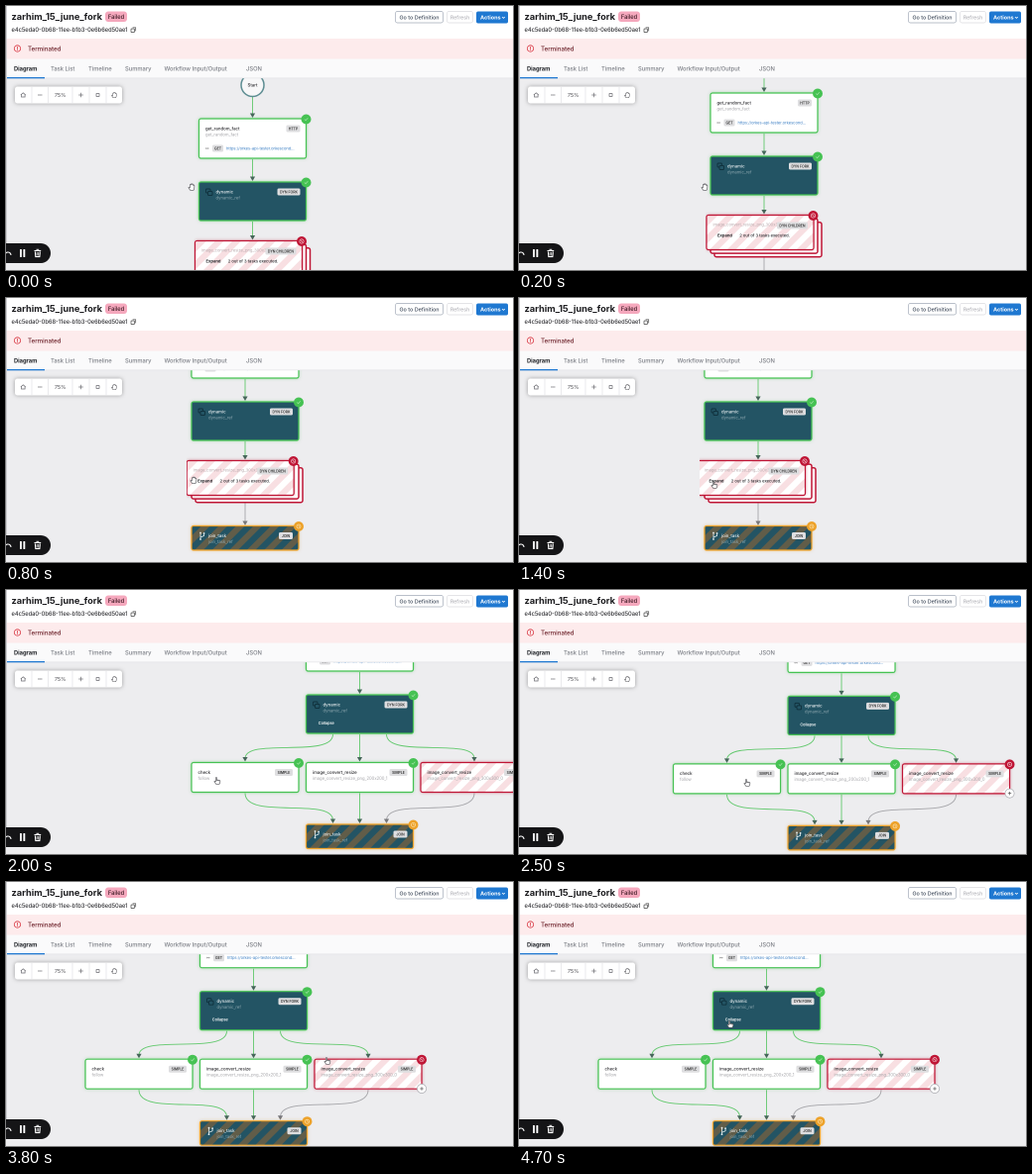
Animation of 511 by 267 pixels, one loop 4.8 s. Source, as an HTML page with a canvas:

```html
<!DOCTYPE html>
<html lang="en">
<head>
<meta charset="utf-8">
<title>Workflow run</title>
<style>
html, body { margin: 0; width: 100%; height: 100%; overflow: hidden; background: #fff; }
canvas { display: block; width: 511px; height: 267px; }
</style>
</head>
<body>
<canvas id="stage"></canvas>
<script>
const W = 511, H = 267, LOOP = 4800, STEP = 100, EXPAND_AT = 1500;
const GREEN = '#46c253', RED = '#bf1535', AMBER = '#eda22a', TEAL = '#235464', INK = '#2a2a2e';
const NODE_W = 108, STRIPE = 17.5;
const canvas = document.getElementById('stage');
const c = canvas.getContext('2d');
// Double resolution keeps the tiny lettering smooth
const scale = 2 * (window.devicePixelRatio || 1);
canvas.width = W * scale;
canvas.height = H * scale;

// Rows of [time, x, y]
const scrollKeys = [[0, 0, 0], [100, -0.5, -7], [200, -1.5, -26], [300, -3, -50],
  [400, -4.5, -67], [500, -6.5, -72], [600, -7.5, -73]];
const cursorKeys = [[0, 187, 183], [700, 187, 183], [1200, 197, 189], [1600, 197, 189],
  [2000, 213, 193], [2500, 230, 195], [3000, 331, 197], [3500, 324, 181],
  [4200, 324, 181], [4700, 213, 144]];

const clamp = v => Math.max(0, Math.min(1, v));
const smooth = v => v * v * (3 - 2 * v);

function track(keys, t) {
  let i = 1;
  while (i < keys.length - 1 && keys[i][0] < t) i++;
  const a = keys[i - 1], b = keys[i], k = clamp((t - a[0]) / (b[0] - a[0]));
  return [a[1] + (b[1] - a[1]) * k, a[2] + (b[2] - a[2]) * k];
}

function text(s, x, y, size, color = INK, weight = 500, align = 'left') {
  c.font = `${weight} ${size}px Inter, "Open Sans", sans-serif`;
  c.textAlign = align;
  c.fillStyle = color;
  c.fillText(s, x, y);
}

function box(x, y, w, h, r, fill, stroke, width = 1) {
  c.beginPath();
  c.roundRect(x, y, w, h, r);
  if (fill) { c.fillStyle = fill; c.fill(); }
  if (stroke) { c.strokeStyle = stroke; c.lineWidth = width; c.stroke(); }
}

function line(points, color, width = 1) {
  c.beginPath();
  points.forEach(([x, y]) => c.lineTo(x, y));
  c.strokeStyle = color;
  c.lineWidth = width;
  c.stroke();
}

function disc(x, y, r, fill, stroke, width = 1) {
  box(x - r, y - r, 2 * r, 2 * r, r, fill, stroke, width);
}

function glow(color, blur, draw) {
  c.save();
  c.shadowColor = color;
  c.shadowBlur = blur * scale;
  draw();
  c.restore();
}

function stripes(x, y, w, h, color) {
  c.save();
  c.beginPath();
  c.roundRect(x, y, w, h, 2);
  c.clip();
  c.fillStyle = color;
  for (let s = x + w + h - STRIPE; s > x - STRIPE; s -= STRIPE) {
    c.beginPath();
    c.moveTo(s, y);
    c.lineTo(s + STRIPE / 2, y);
    c.lineTo(s + STRIPE / 2 - h, y + h);
    c.lineTo(s - h, y + h);
    c.fill();
  }
  c.restore();
}

function badge(x, y, color) {
  disc(x, y, 5, color);
  if (color === GREEN) {
    line([[x - 1.7, y], [x - 0.4, y + 1.2], [x + 1.8, y - 1.3]], '#a4e3a8', 0.7);
  } else if (color === RED) {
    disc(x, y, 2.1, null, '#f4c9d2', 0.7);
    line([[x - 0.9, y - 0.9], [x + 0.9, y + 0.9]], '#f4c9d2', 0.7);
  } else {
    disc(x, y, 2, null, '#fff0cc', 0.6);
    line([[x, y - 1.2], [x, y], [x + 1, y + 0.4]], '#fff0cc', 0.5);
  }
}

function tag(s, right, y, w) {
  box(right - w, y, w, 7, 1.5, '#dedee0');
  text(s, right - w / 2, y + 4.8, 3.5, '#333', 600, 'center');
}

function frame(x, y, h, edge, fill, stripe) {
  glow(edge + 'a0', 3, () => box(x, y, NODE_W, h, 2, fill));
  if (stripe) stripes(x, y, NODE_W, h, stripe);
  box(x, y, NODE_W, h, 2, null, edge, 1.2);
}

function node(x, y, h, edge, fill, title, ref, label, labelW, o = {}) {
  frame(x, y, h, edge, fill, o.stripe);
  const dark = fill === TEAL, indent = o.indent || 6.5;
  text(title, x + indent, y + 11.3, 4.3, dark ? '#f1f5f6' : INK);
  text(ref, x + indent, y + 17.3, 4.2, dark ? '#8fa9b1' : '#a6a6aa', 400);
  tag(label, x + 102, y + 6.5, labelW);
  badge(x + NODE_W, y + 0.5, edge);
}

function arrowhead(x, y, color) {
  c.beginPath();
  c.moveTo(x - 2.6, y - 4.5);
  c.lineTo(x + 2.6, y - 4.5);
  c.lineTo(x, y);
  c.fillStyle = color;
  c.fill();
}

function edge(x1, y1, x2, y2, live = true) {
  const d = (y2 - y1) * 0.9;
  c.beginPath();
  c.moveTo(x1, y1);
  c.bezierCurveTo(x1, y1 + d, x2, y2 - d, x2, y2 - 3);
  c.strokeStyle = live ? '#62c96d' : '#a6a6aa';
  c.lineWidth = 0.9;
  c.stroke();
  arrowhead(x2, y2, live ? '#46665a' : '#77777b');
}

function upperNodes(x, y, open) {
  const mid = x + NODE_W / 2, top = y - 64;
  edge(mid, top - 22, mid, top - 1);
  disc(mid, top - 34, 11.5, '#f7f7f8', '#5d8d92', 1.5);
  text('Start', mid, top - 32.5, 4.3, INK, 500, 'center');

  node(x, top, 40, GREEN, '#fff', 'get_random_fact', 'get_random_fact', 'HTTP', 14);
  text('⚯', x + 6.5, top + 31.5, 4, '#555');
  box(x + 13.5, top + 26.5, 11, 7, 1.5, '#dedee0');
  text('GET', x + 19, top + 31.4, 3.5, '#333', 600, 'center');
  text('https://orkes-api-tester.orkescond…', x + 27.5, top + 31.5, 4, '#3b7fc4', 400);

  edge(mid, top + 41, mid, y - 1);
  node(x, y, 39, GREEN, TEAL, 'dynamic', 'dynamic_ref', 'DYN FORK', 23, { indent: 17 });
  box(x + 7, y + 7, 4.5, 4, 1, null, '#10313d', 0.9);
  box(x + 9, y + 9.5, 4.5, 4, 1, TEAL, '#10313d', 0.9);
  if (open) text('Collapse', x + 12.3, y + 30, 3.8, '#fff', 600);
}

function joinNode(x, y) {
  node(x, y, 24.5, AMBER, TEAL, 'join_task', 'join_task_ref', 'JOIN', 14, { indent: 17, stripe: '#615d49' });
  const ix = x + 9, iy = y + 10;
  line([[ix, iy - 3], [ix, iy + 4]], '#e7eeee', 0.8);
  line([[ix, iy + 1.5], [ix + 3.6, iy], [ix + 3.6, iy - 2]], '#e7eeee', 0.8);
  [[0, -3], [0, 3.5], [3.6, -2.5]].forEach(([a, b]) => disc(ix + a, iy + b, 0.9, '#e7eeee'));
}

function collapsed(x, y, hover) {
  const mid = x + NODE_W / 2, cy = y + 59.5, fx = x - 4 - 2.5 * hover;
  upperNodes(x, y, false);
  edge(mid, y + 40, mid, cy - 1);
  edge(mid, cy + 43, mid, y + 125, false);
  c.save();
  c.beginPath();
  c.rect(x - 5, cy - 8, 125, 60);
  c.clip();
  for (const k of [2, 1]) box(x - 4 + 4 * k, cy + 3.6 * k, NODE_W, 35, 2, '#fff', RED, 1.5);
  frame(fx, cy, 35, RED, '#fff', '#f8dfe2');
  text('image_convert_resize_png_300x300', fx + 6.5, cy + 11, 4.1, '#b9a9ad', 400);
  tag('DYN CHILDREN', fx + 102, cy + 7, 31);
  text('Expand', fx + 11, cy + 21.8, 4.1, INK, 700);
  text('2 out of 3 tasks executed.', fx + 33.3, cy + 21.8, 4.1, INK, 500);
  badge(fx + NODE_W - 0.5, cy + 0.5, RED);
  c.restore();
  joinNode(x, y + 125.5);
}

function expanded(x, y, plus) {
  const cy = y + 68.5, jy = y + 131, mid = NODE_W / 2;
  upperNodes(x, y, true);
  [-1, 0, 1].forEach(k => {
    const far = x + mid + 115.5 * k, near = x + mid + 27 * k;
    edge(near, y + 40, far, cy - 1);
    edge(far, cy + 31, near, jy - 1, k < 1);
  });
  node(x - 115.5, cy, 30, GREEN, '#fff', 'check', 'follow', 'SIMPLE', 18);
  node(x, cy, 30, GREEN, '#fff', 'image_convert_resize', 'image_convert_resize_png_200x200_1', 'SIMPLE', 18);
  node(x + 115.5, cy, 30, RED, '#fff', 'image_convert_resize', 'image_convert_resize_png_300x300_0',
    'SIMPLE', 18, { stripe: '#f8dfe2' });
  if (plus) {
    const px = x + 223.5, py = cy + 29.8;
    disc(px, py, 4.6, '#fff', '#aaaab0', 0.7);
    line([[px - 1.7, py], [px + 1.7, py]], '#555', 0.7);
    line([[px, py - 1.7], [px, py + 1.7]], '#555', 0.7);
  }
  joinNode(x, jy);
}

function header() {
  c.fillStyle = '#fff';
  c.fillRect(0, 0, W, 73);
  text('zarhim_15_june_fork', 5.5, 14.2, 9.2, '#1d1d20', 700);
  box(100, 5.5, 22, 10.5, 3, '#f5a8bd');
  text('Failed', 111, 12.8, 5.7, '#3d1a24', 500, 'center');
  text('e4c5eda0-0b68-11ee-b1b3-0e6b6ed50ae1', 5.5, 26, 5.7, '#303034');
  box(126, 23, 3.4, 3.6, 0.6, null, '#444', 0.7);
  line([[127.6, 21.8], [130.7, 21.8], [130.7, 25.4]], '#444', 0.7);

  box(392.5, 5.5, 48, 11.5, 2, '#fff', '#a3abb8', 0.7);
  text('Go to Definition', 416.5, 13.6, 5.4, '#414c5c', 500, 'center');
  box(444.5, 5.5, 26, 11.5, 2, '#fff', '#dcdce0', 0.7);
  text('Refresh', 457.5, 13.6, 5.3, '#b4b4ba', 500, 'center');
  box(474, 5.5, 32, 12, 2, '#1f78d1');
  text('Actions', 478, 13.6, 5.5, '#fff', 700);
  line([[500, 11], [501.4, 12.3], [502.8, 11]], '#fff', 0.8);

  c.fillStyle = '#fdebec';
  c.fillRect(0, 33, W, 20.5);
  disc(11.5, 43, 3.2, null, '#d93a45', 0.8);
  line([[11.5, 41.2], [11.5, 43.6]], '#d93a45', 0.9);
  line([[11.5, 44.2], [11.5, 45]], '#d93a45', 0.9);
  text('Terminated', 22, 45.3, 6.2, '#6b2029', 500);

  c.fillStyle = '#fafafb';
  c.fillRect(0, 53.5, W, 19.5);
  text('Diagram', 8, 65.6, 5.7, '#1f2227', 700);
  [['Task List', 45], ['Timeline', 83], ['Summary', 120], ['Workflow Input/Output', 159.5], ['JSON', 242]]
    .forEach(([s, x]) => text(s, x, 65.6, 5.8, '#7b7e85'));
  c.fillStyle = '#dfdfe3';
  c.fillRect(0, 72.6, W, 0.6);
  c.fillStyle = '#1f78d1';
  c.fillRect(1, 72, 38, 1.3);
}

function toolbar() {
  glow('rgba(0,0,0,.35)', 4, () => box(9, 81.5, 108, 17, 2.5, '#fff'));
  [26, 42.5, 67, 84, 101].forEach(x => line([[x, 82], [x, 98]], '#e2e2e6', 0.7));
  const y = 90, ink = '#6a6a70';
  line([[14.8, y], [17.3, y - 2.2], [19.8, y]], ink, 0.7);
  line([[15.5, y - 0.5], [15.5, y + 2], [19.1, y + 2], [19.1, y - 0.5]], ink, 0.7);
  line([[32, y], [36.5, y]], ink, 0.7);
  text('75%', 54.7, y + 2.1, 5.5, '#55555a', 400, 'center');
  line([[73.2, y], [77.8, y]], ink, 0.7);
  line([[75.5, y - 2.3], [75.5, y + 2.3]], ink, 0.7);
  box(91, y - 1.5, 3, 3, 0.3, null, ink, 0.7);
  hand(109, y, true, 0.65);
}

function recorder() {
  box(-12, 240, 57, 20, 10, '#151517');
  c.beginPath();
  c.arc(2, 252, 3, -2.4, 0);
  c.strokeStyle = '#fff';
  c.lineWidth = 1.1;
  c.stroke();
  [14, 17.4].forEach(x => box(x, 246, 1.9, 8, 0.5, '#fff'));
  line([[28.5, 247.5], [35.2, 247.5]], '#fff', 1.1);
  line([[30.5, 246.3], [33.2, 246.3]], '#fff', 1);
  line([[29.4, 248.5], [29.8, 253.6], [33.9, 253.6], [34.3, 248.5]], '#fff', 1.1);
  line([[31.1, 249], [31.1, 252.5]], '#fff', 0.7);
  line([[32.7, 249], [32.7, 252.5]], '#fff', 0.7);
}

// Open palm or pointing finger, centred on (x, y)
function hand(x, y, open, size) {
  const tops = open ? [-3.2, -4, -3.6, -2.4] : [-4.4, -1.2, -0.9, -0.5];
  c.save();
  c.translate(x, y);
  c.scale(size, size);
  c.beginPath();
  c.moveTo(-1.6, 4.2);
  c.lineTo(-3.9, 0.9);
  c.quadraticCurveTo(-3.4, -0.5, -2, 0.9);
  tops.forEach((top, i) => {
    const fx = -2 + i * 1.4;
    c.lineTo(fx, top + 0.6);
    c.quadraticCurveTo(fx + 0.7, top - 0.8, fx + 1.4, top + 0.6);
    if (i < 3 && !open) c.lineTo(fx + 1.4, -0.2);
  });
  c.lineTo(3.4, 2);
  c.lineTo(2.5, 4.2);
  c.closePath();
  c.lineJoin = 'round';
  c.fillStyle = '#fff';
  c.fill();
  c.strokeStyle = '#55555a';
  c.lineWidth = 0.8;
  c.stroke();
  c.restore();
}

function draw(t) {
  c.setTransform(scale, 0, 0, scale, 0, 0);
  c.fillStyle = '#ededef';
  c.fillRect(0, 0, W, H);
  c.save();
  c.beginPath();
  c.rect(0, 73, W, H - 73);
  c.clip();
  if (t < EXPAND_AT) {
    const [dx, dy] = track(scrollKeys, t);
    collapsed(194.5 + dx, 178 + dy, clamp((t - 700) / 300));
  } else {
    const p = smooth(clamp((t - 2220) / 780));
    expanded(302.5 - 107 * p, 106 + 4.7 * p, t > 2200);
  }
  c.restore();
  header();
  toolbar();
  recorder();
  c.fillStyle = '#c4c4c8';
  c.fillRect(0, 0, 0.8, 240);
  const [x, y] = track(cursorKeys, t);
  hand(x, y, t < 1000, 0.8);
}

const begin = performance.now();
function tick() {
  const t = (performance.now() - begin) % LOOP;
  draw(Math.floor(t / STEP) * STEP);
  requestAnimationFrame(tick);
}
tick();
</script>
</body>
</html>
```
